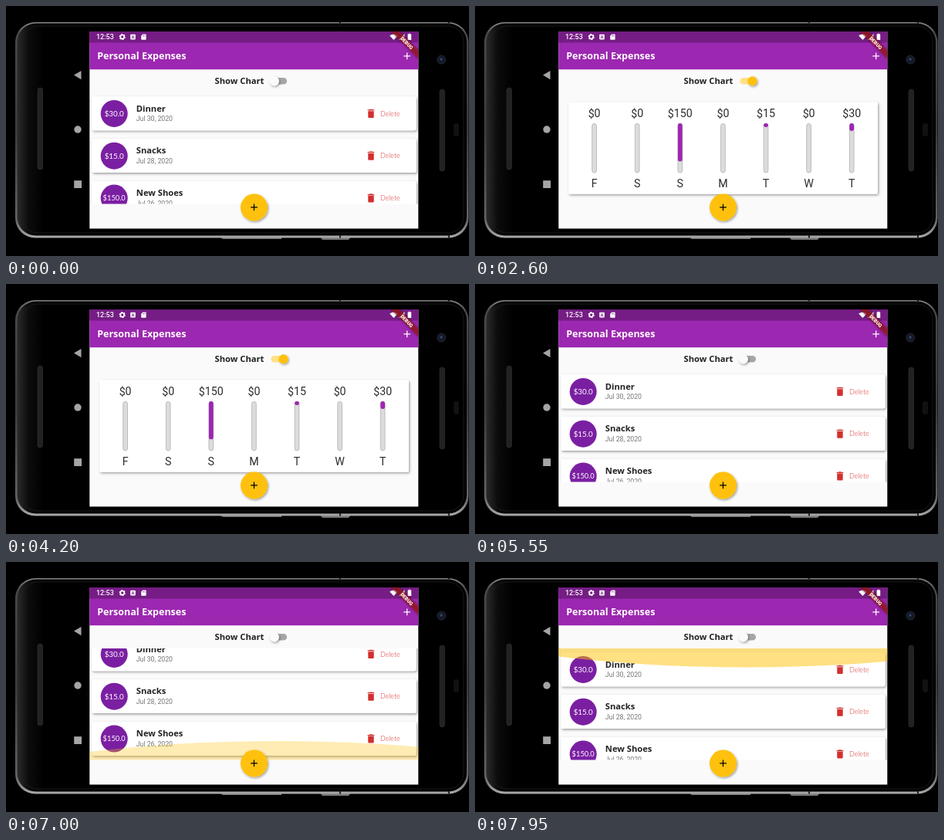
These frames come from a looping animation (600 by 324 pixels, 8 s). An HTML page:

```html
<!DOCTYPE html>
<html lang="en">
<head>
<meta charset="utf-8">
<title>Personal Expenses</title>
<style>
html, body { margin: 0; width: 100%; height: 100%; overflow: hidden; background: #000; }
svg { display: block; width: 600px; height: 324px; }
text { font-family: Roboto, sans-serif; }
.bold { font-family: "Open Sans", sans-serif; font-weight: 700; }
.lato { font-family: Lato, sans-serif; }
.mid { text-anchor: middle; }
</style>
</head>
<body>
<svg viewBox="0 0 600 324">
  <defs>
    <linearGradient id="rim" x2="0" y2="1">
      <stop offset="0" stop-color="#8a8a8a"/><stop offset=".05" stop-color="#4a4a4a"/>
      <stop offset=".5" stop-color="#3c3c3c"/><stop offset=".92" stop-color="#666"/><stop offset="1" stop-color="#aaa"/>
    </linearGradient>
    <linearGradient id="panel">
      <stop offset="0" stop-color="#2c2c2c"/><stop offset=".025" stop-color="#0c0c0c"/><stop offset=".06" stop-color="#000"/>
    </linearGradient>
    <filter id="shadow" x="-20%" y="-30%" width="140%" height="170%">
      <feDropShadow dx="1.2" dy="1.5" stdDeviation="1.4" flood-opacity=".38"/>
    </filter>
    <filter id="blur" x="-20%" y="-80%" width="140%" height="260%"><feGaussianBlur stdDeviation="1.6"/></filter>
    <clipPath id="screen"><rect x="108.3" y="33" width="426" height="255.6"/></clipPath>
    <clipPath id="view"><rect x="108" y="112" width="427" height="144.5"/></clipPath>
    <path id="plus" d="M19 13h-6v6h-2v-6H5v-2h6V5h2v6h6v2z"/>
    <path id="bin" d="M6 19c0 1.1.9 2 2 2h8c1.1 0 2-.9 2-2V7H6v12zM19 4h-3.5l-1-1h-5l-1 1H5v2h14V4z"/>
  </defs>
  <rect width="600" height="324"/>

  <g id="phone">
    <path d="M277 299h80v3h-76zM407 299h40l-3 4h-34z" fill="#777"/>
    <rect x="12" y="21" width="587.5" height="279.5" rx="26" fill="url(#rim)"/>
    <rect x="14.5" y="22.6" width="582.5" height="275" rx="24" fill="url(#panel)"/>
    <rect x="21" y="26" width="572" height="268" rx="20" fill="none" stroke="#1f1f1f" stroke-width=".8"/>
    <path d="M433 21v3M574 21v3M433 297v3.5M574 297v3.5" stroke="#222" stroke-width="2"/>
    <rect x="41" y="106" width="6.5" height="106" rx="3.2" fill="#222" stroke="#343434" stroke-width=".6"/>
    <rect x="562" y="108" width="6.5" height="106" rx="3.2" fill="#222" stroke="#343434" stroke-width=".6"/>
    <circle cx="564.3" cy="69.5" r="5.5" fill="#141927" stroke="#242832"/>
    <circle cx="564" cy="69" r="1.7" fill="#344469"/>
    <rect x="580" y="152" width="7" height="17" rx="3" fill="#111"/>
    <g fill="#a5a5a5">
      <path d="M88 89.6 97.5 84v11.2z"/><circle cx="93" cy="160" r="4.7"/><path d="M88.2 226.2h9.8v9.8h-9.8z"/>
    </g>
  </g>

  <g clip-path="url(#screen)">
    <rect x="108" y="33" width="427" height="256" fill="#fafafa"/>
    <g id="list" clip-path="url(#view)"><g id="cards"></g></g>
    <g id="chart"></g>
    <ellipse id="glow" cx="352" rx="640" fill="#ffc107" clip-path="url(#view)"/>

    <text class="bold" x="270.6" y="101.2" font-size="11.2" fill="#222">Show Chart</text>
    <rect id="track" x="343.4" y="93" width="20.6" height="8.6" rx="4.3"/>
    <circle id="thumb" cy="97.3" r="6.1" filter="url(#shadow)"/>

    <circle cx="321.5" cy="261" r="17.5" fill="#ffc107" filter="url(#shadow)"/>
    <use href="#plus" transform="translate(314 253.5) scale(.623)"/>

    <rect x="108" y="33" width="427" height="49.2" fill="#9c27b0"/>
    <rect x="108" y="33" width="427" height="14.5" fill="#751d84"/>
    <text class="bold" x="118.2" y="69.4" font-size="12.5" fill="#fff">Personal Expenses</text>
    <use href="#plus" transform="translate(512.2 57.3) scale(.623)" fill="#fff"/>
    <g fill="#fff">
      <text x="117" y="43.4" font-size="9" font-weight="500">12:53</text>
      <circle cx="150.7" cy="40" r="2.5" fill="none" stroke="#fff" stroke-width="1.7"/>
      <circle cx="150.7" cy="40" r="3.5" fill="none" stroke="#fff" stroke-width="1.2" stroke-dasharray="1.83"/>
      <rect x="161.2" y="36.8" width="6.6" height="6.6" rx=".8"/>
      <path d="M163 42.2l1.5-4 1.5 4m-2.4-1.3h1.8" fill="none" stroke="#751d84" stroke-width=".8"/>
      <path d="M177.3 36.4h3.6q.7 0 .7.7v5.9q0 .7-.7.7h-5q-.7 0-.7-.7v-4.5z"/>
      <path d="M177.4 37.8v1.6m1.3-1.6v1.6m1.3-1.6v1.6" stroke="#751d84" stroke-width=".6"/>
      <path d="M497.2 38.4q5.2-3.9 10.4 0l-5.2 5.6z"/>
      <path d="M516.5 36v8h-8z"/>
      <path d="M521.8 35.8h2.2v.8h1.2v7.4h-4.6v-7.4h1.2z"/>
    </g>
    <g transform="translate(534.3 33) rotate(45)">
      <rect x="-25" y="17.4" width="50" height="7.5" fill-opacity=".5" filter="url(#blur)"/>
      <rect x="-25" y="17.4" width="50" height="7.5" fill="#b71c1c" fill-opacity=".63"/>
      <text class="mid" y="23.4" font-size="6.3" font-weight="900" fill="#fff">DEBUG</text>
    </g>
  </g>
</svg>
<script>
const LOOP = 8000, ON = 2000, OFF = 4850, TRAVEL = 20;
const $ = id => document.getElementById(id);
const purple = "#9c27b0", amber = [255, 193, 7];

const expenses = [
  ["Dinner", "Jul 30, 2020", "$30.0", 9.8],
  ["Snacks", "Jul 28, 2020", "$15.0", 9.8],
  ["New Shoes", "Jul 26, 2020", "$150.0", 9.3]
];
$("cards").innerHTML = expenses.map(([name, date, cost, size], i) => `
  <g transform="translate(0 ${i * 54.8})">
    <rect x="111.3" y="117.3" width="420.3" height="44" rx="2.5" fill="#fff" filter="url(#shadow)"/>
    <circle cx="140.2" cy="139.4" r="17.5" fill="#7b1fa2"/>
    <text class="lato mid" x="140.2" y="142.8" font-size="${size}" fill="#fff">${cost}</text>
    <text class="bold" x="168.8" y="136.7" font-size="11.2" fill="#222">${name}</text>
    <text x="168.8" y="149.4" font-size="8.72" fill="#757575">${date}</text>
    <g fill="#d32f2f">
      <use href="#bin" transform="translate(465.5 131.8) scale(.623)"/>
      <text class="lato" x="485" y="142.6" font-size="8.9" font-weight="300">Delete</text>
    </g>
  </g>`).join("");

const spent = [0, 0, 150, 0, 15, 0, 30];
const total = spent.reduce((a, b) => a + b);
$("chart").innerHTML = `<rect x="121" y="124.5" width="401" height="119.3" rx="2.5" fill="#fff" filter="url(#shadow)"/>` +
  spent.map((sum, i) => `
  <g transform="translate(${154.6 + i * 55.6} 0)" font-size="14.2" fill="#2c2c2c">
    <text class="mid" y="144">$${sum}</text>
    <rect x="-2.9" y="152.4" width="5.8" height="63.6" rx="2.9" fill="#dcdcdc" stroke="#9e9e9e" stroke-width=".6"/>
    ${sum ? `<rect x="-2.9" y="152.1" width="5.8" height="${64 * sum / total}" rx="2.9" fill="${purple}"/>` : ""}
    <text class="mid" y="235">${"FSSMTWT"[i]}</text>
  </g>`).join("");

const ramp = (t, a, b) => {
  const p = Math.min(1, Math.max(0, (t - a) / (b - a)));
  return p * p * (3 - 2 * p);
};
const mix = (a, b, p) => `rgb(${a.map((v, i) => Math.round(v + (b[i] - v) * p))})`;

// The glow is a flattened circle of radius 640, of which a cap 85 high shows at full size.
function setGlow(bottom, depth, alpha) {
  const ry = 640 * depth / 85, center = ry - depth;
  const glow = $("glow");
  glow.setAttribute("cy", bottom ? 256.5 + center : 112 - center);
  glow.setAttribute("ry", ry);
  glow.setAttribute("fill-opacity", alpha);
}

function draw(t) {
  const chart = t >= ON && t < OFF;
  $("chart").style.display = chart ? "" : "none";
  $("list").style.display = chart ? "none" : "";

  const on = ramp(t, ON, ON + 200) - ramp(t, OFF, OFF + 200);
  $("thumb").setAttribute("cx", 347.8 + 11.7 * on);
  $("thumb").setAttribute("fill", mix([250, 250, 250], amber, on));
  $("track").setAttribute("fill", mix([166, 166, 166], [255, 224, 131], on));

  const scroll = ramp(t, 6450, 6750) - ramp(t, 7350, 7600);
  $("cards").setAttribute("transform", `translate(0 ${-TRAVEL * scroll})`);

  const bottom = t < 7400;
  const pull = bottom ? ramp(t, 6700, 6900) - ramp(t, 7050, 7350) : ramp(t, 7580, 7850);
  setGlow(bottom, 24.5 * pull, (bottom ? .3 : .5) * pull);
}

const start = performance.now();
function tick() {
  draw((performance.now() - start) % LOOP);
  requestAnimationFrame(tick);
}
tick();
</script>
</body>
</html>
```
